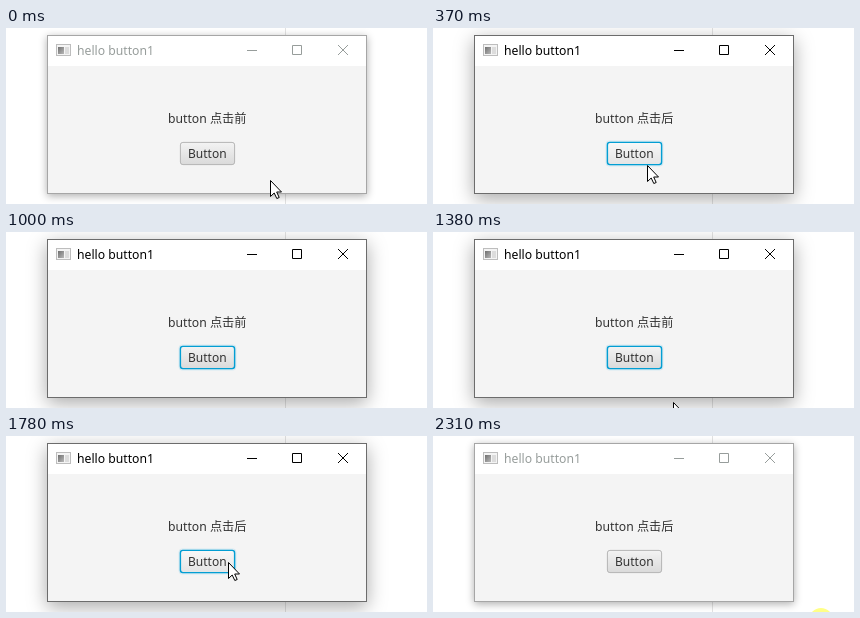
Recreate the animation shown at these times as an HTML page. Size 421 px wide and 176 px high, loop 2390 ms.

```html
<!DOCTYPE html>
<html lang="zh">
<head>
<meta charset="utf-8">
<title>hello button1</title>
<style>
  html, body { margin: 0; width: 100%; height: 100%; overflow: hidden; background: #fff; }
  #stage {
    position: relative; width: 421px; height: 176px; overflow: hidden;
    background: linear-gradient(#e2e2e2, #e2e2e2) 279px 0 / 1px 100% no-repeat, #fff;
  }
  #window {
    position: absolute; left: 41px; top: 7px; width: 318px; height: 157px;
    border: 1px solid #a6a6a6;
    background: linear-gradient(#fff 30px, #f4f4f4 30px);
    box-shadow: 0 2px 8px rgba(0, 0, 0, .32);
  }
  #window.active {
    border-color: #6c6c6c;
    box-shadow: 0 5px 18px rgba(0, 0, 0, .34);
  }
  svg { position: absolute; left: 0; top: 0; }
  text { font: 12px "Noto Sans", "Noto Sans CJK SC", "Noto Sans CJK", sans-serif; fill: #333; }
  #label { font-size: 12.2px; }
  #controls { fill: none; stroke: currentColor; }
  #title { font-size: 12.2px; fill: currentColor; }
</style>
</head>
<body>
<div id="stage">
  <div id="window"></div>
  <svg width="421" height="176" viewBox="0 0 421 176">
    <defs>
      <linearGradient id="normal" x2="0" y2="1"><stop stop-color="#f3f3f3"/><stop offset="1" stop-color="#dadada"/></linearGradient>
      <linearGradient id="hover" x2="0" y2="1"><stop stop-color="#f8f8f8"/><stop offset="1" stop-color="#e4e4e4"/></linearGradient>
      <linearGradient id="pressed" x2="0" y2="1"><stop stop-color="#dedede"/><stop offset="1" stop-color="#cbcbcb"/></linearGradient>
      <linearGradient id="pane" x2="1" y2="1"><stop stop-color="#6f6f6f"/><stop offset="1" stop-color="#b8b8b8"/></linearGradient>
    </defs>

    <g id="icon">
      <rect x="50.5" y="16.5" width="14" height="11" fill="#f4f4f4" stroke="#bdbdbd"/>
      <rect x="52" y="19" width="6" height="7" fill="url(#pane)"/>
      <rect x="59" y="19" width="4" height="7" fill="#dcdcdc"/>
    </g>
    <g id="chrome">
      <text id="title" x="71" y="27">hello button1</text>
      <path id="controls" d="M241 22.5h10M286.5 17.5h9v9h-9zM332 17l10 10M342 17l-10 10"/>
    </g>

    <text id="label" x="162" y="95"></text>
    <rect id="glow" x="172.6" y="112.6" width="57.8" height="25.8" rx="4" fill="#039ed3" fill-opacity=".13"/>
    <rect id="button" x="174.4" y="114.4" width="54.2" height="22.2" rx="2.5"/>
    <text x="182" y="130">Button</text>

    <path id="cursor" d="M.5 .5V16.5L4.2 13L6.8 18.5L9.2 17.5L6.7 12H11.5Z" fill="#fff" stroke="#000"/>
    <circle id="halo" r="12" fill="#ff0" fill-opacity=".47"/>
  </svg>
</div>
<script>
const DURATION = 2390;
const $ = id => document.getElementById(id);

// Pointer tip from each time on; without a position the pointer is out of view.
const pointer = [
  [0, 264, 152], [70, 214, 137], [920, 239, 149], [1000],
  [1380, 240, 170], [1460, 234, 152], [1530, 227, 136], [1610, 222, 126],
  [1850, 333, 163], [1930, 375, 171], [2000], [2310, 388, 184]
];

const within = (t, ...spans) => spans.some(([from, to]) => t >= from && t < to);
const show = (id, visible) => { $(id).style.display = visible ? '' : 'none'; };

function draw(t) {
  const [, x, y] = pointer.findLast(([start]) => start <= t);
  const visible = x !== undefined;
  const hovered = visible && x >= 174 && x <= 229 && y >= 114 && y <= 137;
  const active = within(t, [220, 2310]);
  const pressed = within(t, [220, 300], [770, 840], [1700, 1770]);
  const halo = within(t, [220, 370], [770, 840], [1700, 1770], [2310, DURATION]);
  const clicked = within(t, [300, 840], [1770, DURATION]);

  $('window').classList.toggle('active', active);
  $('chrome').style.color = active ? '#000' : '#979d9b';
  $('label').textContent = 'button 点击' + (clicked ? '后' : '前');

  const button = $('button');
  button.setAttribute('fill', `url(#${pressed ? 'pressed' : hovered ? 'hover' : 'normal'})`);
  button.setAttribute('stroke', active ? '#039ed3' : '#b4b4b4');
  button.setAttribute('stroke-width', active ? 1.4 : 1);

  show('glow', active);
  show('cursor', visible);
  show('halo', halo);
  if (visible) {
    for (const id of ['cursor', 'halo']) $(id).setAttribute('transform', `translate(${x} ${y})`);
  }
}

const start = performance.now();
function tick() {
  draw((performance.now() - start) % DURATION);
  requestAnimationFrame(tick);
}
tick();
</script>
</body>
</html>
```
